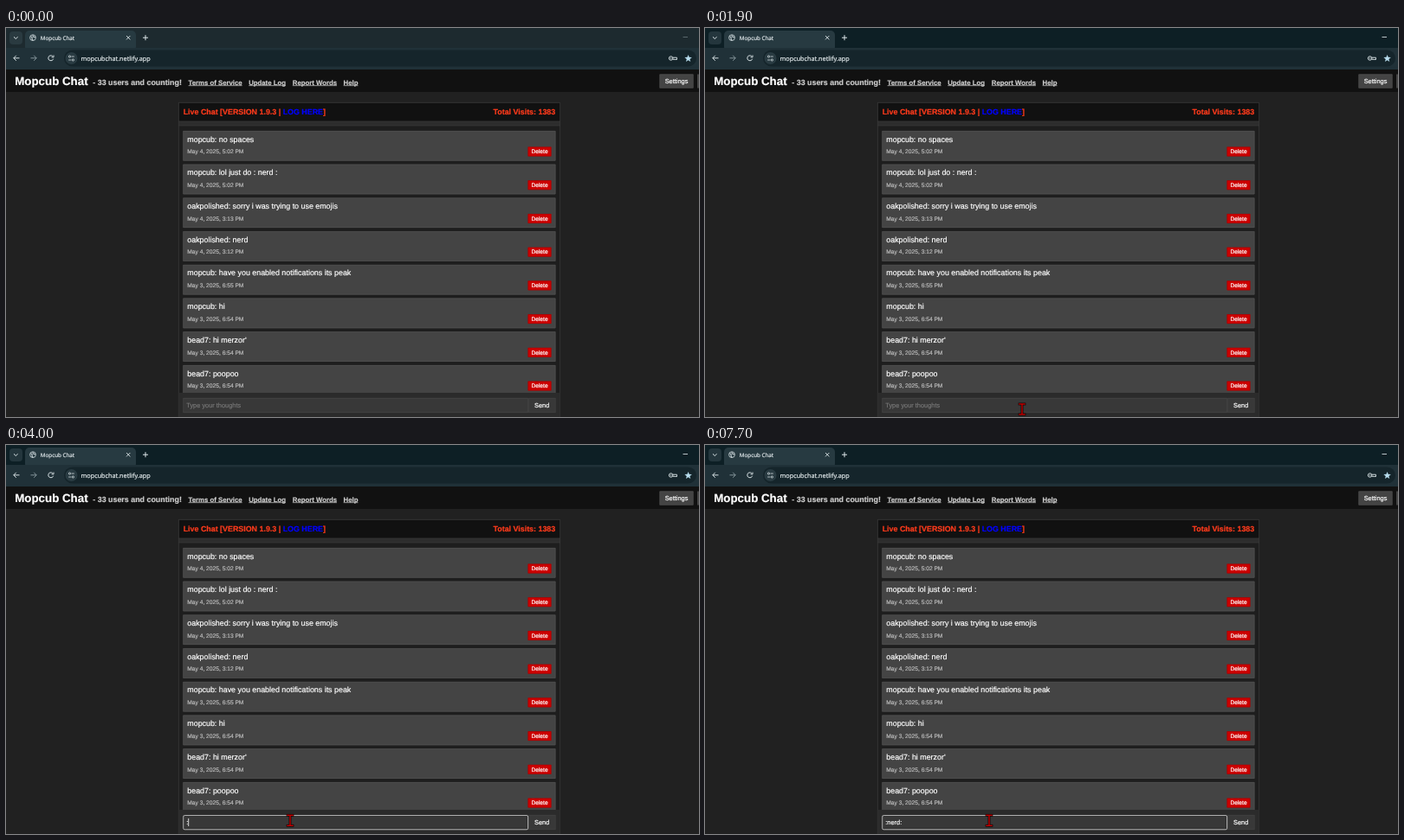
Write an HTML page with a canvas that moves like this. It is 800x450 px and loops after 8 s.

```html
<!DOCTYPE html>
<html lang="en">
<head>
<meta charset="utf-8">
<title>Mopcub Chat</title>
<style>
  html, body { margin: 0; width: 100%; height: 100%; overflow: hidden; background: #212121; }
  canvas { display: block; width: 800px; height: 450px; }
</style>
</head>
<body>
<canvas id="stage" width="800" height="450"></canvas>
<script>
const ctx = document.getElementById('stage').getContext('2d');
const LOOP = 8000, STEP = 100;
const PX = 5 / 9; // page pixels to stage pixels
const SANS = '"Liberation Sans", Arial, sans-serif';
const UI = '"Open Sans", "Noto Sans", sans-serif';

const MESSAGES = [
  ['mopcub: no spaces', 'May 4, 2025, 5:02 PM'],
  ['mopcub: lol just do : nerd :', 'May 4, 2025, 5:02 PM'],
  ['oakpolished: sorry i was trying to use emojis', 'May 4, 2025, 3:13 PM'],
  ['oakpolished: nerd', 'May 4, 2025, 3:12 PM'],
  ['mopcub: have you enabled notifications its peak', 'May 3, 2025, 6:55 PM'],
  ['mopcub: hi', 'May 3, 2025, 6:54 PM'],
  ["bead7: hi merzor'", 'May 3, 2025, 6:54 PM'],
  ['bead7: poopoo', 'May 3, 2025, 6:54 PM']
];

const ACTIVE_AT = 1200, FOCUS_AT = 2000;
const TYPING = [[3800, ':'], [5900, ':n'], [6000, ':ne'], [6500, ':ner'], [6700, ':nerd'], [7200, ':nerd:']];
const CARET_FLIPS = [2000, 2600, 3100, 3600, 3800, 4400, 4900, 5400, 5900, 7700];
const POINTER = [[1700, 374, 449], [1900, 366, 441], [2100, 361, 437.5], [2300, 361, 437.5], [2400, 360.5, 437],
  [2700, 343, 436], [3100, 328, 434.3]];

function rect(x, y, w, h, fill, radius = 0) {
  ctx.fillStyle = fill;
  ctx.beginPath();
  ctx.roundRect(x, y, w, h, radius);
  ctx.fill();
}

function frame(x, y, w, h, color, width = 0.6, radius = 0) {
  ctx.strokeStyle = color;
  ctx.lineWidth = width;
  ctx.beginPath();
  ctx.roundRect(x + width / 2, y + width / 2, w - width, h - width, radius);
  ctx.stroke();
}

function line(color, width, ...points) {
  ctx.strokeStyle = color;
  ctx.lineWidth = width;
  ctx.beginPath();
  points.forEach(([x, y], i) => i ? ctx.lineTo(x, y) : ctx.moveTo(x, y));
  ctx.stroke();
}

function circle(x, y, r, color, width, from = 0, to = Math.PI * 2) {
  ctx.strokeStyle = color;
  ctx.lineWidth = width;
  ctx.beginPath();
  ctx.arc(x, y, r, from, to);
  ctx.stroke();
}

// A hairline stroke gives the text the weight of screen-rendered type.
function text(str, x, y, size, color, { bold = false, family = SANS, align = 'left', underline = false } = {}) {
  ctx.font = `${bold ? 'bold ' : ''}${size}px ${family}`;
  ctx.textAlign = align;
  ctx.fillStyle = ctx.strokeStyle = color;
  ctx.lineWidth = 0.2;
  ctx.lineJoin = 'round';
  ctx.fillText(str, x, y);
  ctx.strokeText(str, x, y);
  const width = ctx.measureText(str).width;
  if (underline) ctx.fillRect(x, y + 0.8, width, 0.7);
  return width;
}

function drawTabs(active) {
  rect(0, 0, 800, 24, active ? '#0d1f25' : '#1d2a2f');
  rect(4, 4, 15, 15, active ? '#24363d' : '#2a3a40', 4);
  line('#dce5e8', 1, [9, 10.3], [11.3, 12.5], [13.6, 10.3]);

  rect(22, 3, 128, 24, '#273a41', 5);
  circle(31, 11.2, 3.4, '#c3ced2', 0.9);
  line('#c3ced2', 1.1, [28.4, 9.6], [30.2, 11], [30, 13], [31.3, 14.3]);
  line('#c3ced2', 1.1, [31, 8], [31.4, 10], [34, 11]);
  text('Mopcub Chat', 39.8, 13.7, 6.3, '#e4ebee', { family: UI });
  line('#dce5e8', 0.9, [139, 9], [143.4, 13.4]);
  line('#dce5e8', 0.9, [143.4, 9], [139, 13.4]);
  line('#dce5e8', 1, [158, 11.2], [164, 11.2]);
  line('#dce5e8', 1, [161, 8.2], [161, 14.2]);
  line(active ? '#e8eff1' : '#69777c', 0.8, [781.5, 10.5], [787, 10.5]);
}

function drawToolbar() {
  rect(0, 23, 800, 25, '#203138');
  rect(67, 25.5, 730, 19, '#15252b', 9.5);

  const light = '#d3dde0', dim = '#84949a';
  line(light, 1, [15.5, 34.8], [8.8, 34.8]);
  line(light, 1, [11.8, 31.8], [8.8, 34.8], [11.8, 37.8]);
  line(dim, 1, [28.5, 34.8], [35.2, 34.8]);
  line(dim, 1, [32.2, 31.8], [35.2, 34.8], [32.2, 37.8]);
  circle(51.8, 34.8, 3, light, 1, 0.3, 5.6);
  line(light, 1, [55, 31.5], [55, 33.8], [52.6, 33.8]);

  ctx.fillStyle = '#293b42';
  ctx.beginPath();
  ctx.arc(75.5, 35, 7, 0, Math.PI * 2);
  ctx.fill();
  circle(73.5, 33, 1.1, light, 0.8);
  line(light, 0.8, [75.5, 33], [78.8, 33]);
  circle(77.4, 37, 1.1, light, 0.8);
  line(light, 0.8, [72.2, 37], [75.4, 37]);
  text('mopcubchat.netlify.app', 86.5, 37.8, 7.3, '#e6edef', { family: UI });

  circle(767.6, 35, 2.2, light, 1);
  circle(767.6, 35, 0.5, light, 0.7);
  line(light, 1, [769.8, 34.2], [774.4, 34.2], [774.4, 36.5], [772.5, 36.5], [769.6, 36.2]);

  ctx.fillStyle = '#b7dced';
  ctx.beginPath();
  for (let i = 0; i < 10; i++) {
    const r = i % 2 ? 1.9 : 4.5, a = i * Math.PI / 5 - Math.PI / 2;
    ctx.lineTo(787.6 + r * Math.cos(a), 35.4 + r * Math.sin(a));
  }
  ctx.fill();
}

function drawHeader() {
  rect(0, 48, 800, 26, '#111111');
  text('Mopcub Chat', 10.2, 65.6, 24 * PX, '#ffffff', { bold: true });
  text('- 33 users and counting!', 100.3, 65.8, 16 * PX, '#cccccc', { bold: true });
  const links = [['Terms of Service', 210.6], ['Update Log', 280.2], ['Report Words', 330.8], ['Help', 389.6]];
  for (const [label, x] of links) {
    text(label, x, 65.6, 14 * PX, '#cccccc', { bold: true, underline: true });
  }
  rect(754.5, 53.5, 39, 16, '#444444');
  frame(754.5, 53.5, 39, 16, '#505050');
  text('Settings', 774, 64, 13.333 * PX, '#ffffff', { align: 'center' });
  rect(798, 53.5, 2, 16, '#444444');
}

function drawMessage([message, date], i) {
  const y = 119 + i * 38.72;
  rect(204.4, y, 430, 34.6, '#444444');
  frame(204.4, y, 430, 34.6, '#555555');
  text(message, 209.3, y + 12.6, 16 * PX, '#ffffff');
  text(date, 209.3, y + 26.2, 12 * PX, '#bbbbbb');
  rect(602.6, y + 18.6, 26.8, 10.8, '#cc0000');
  frame(602.6, y + 18.6, 26.8, 10.8, '#a00000', 0.55);
  text('Delete', 616, y + 26.2, 12 * PX, '#ffffff', { align: 'center' });
}

function drawChat() {
  rect(199, 86, 441, 364, '#2d2d2d');
  rect(199.6, 86.6, 440, 21.2, '#111111');
  rect(199.6, 113, 440, 309, '#1e1e1e');
  frame(199, 86, 441, 370, '#3a3a3a', 0.7);
  line('#3a3a3a', 0.6, [199, 108], [640, 108]);
  line('#3a3a3a', 0.6, [199, 113], [640, 113]);

  const size = 16 * PX, red = '#ff3b1c', bold = { bold: true };
  let x = 204.7;
  x += text('Live Chat [VERSION 1.9.3 | ', x, 99.5, size, red, bold);
  x += text('LOG HERE', x, 99.5, size, '#0000ff', bold);
  text(']', x, 99.5, size, red, bold);
  text('Total Visits: 1383', 634.2, 99.5, size, red, { bold: true, align: 'right' });

  ctx.save();
  ctx.beginPath();
  ctx.rect(199, 113, 441, 309);
  ctx.clip();
  MESSAGES.forEach(drawMessage);
  ctx.restore();
}

function drawInput(t) {
  const typed = TYPING.reduce((now, [at, str]) => t >= at ? str : now, '');
  const focused = t >= FOCUS_AT;
  const size = 13.333 * PX;

  rect(199.6, 422, 440, 28, '#2b2b2b');
  rect(204.4, 428, 398.6, 17, '#383838');
  frame(204.4, 428, 398.6, 17, '#484848');
  rect(603, 428, 31.5, 17, '#383838');
  frame(603, 428, 31.5, 17, '#444444');
  text('Send', 618.7, 438.8, size, '#ffffff', { align: 'center' });
  if (focused) {
    frame(205, 428.9, 397.4, 15.6, '#181818', 0.7, 1);
    frame(204.4, 428.2, 398.6, 17, '#dddddd', 0.8, 1.5);
  }

  const width = text(typed, 208.3, 438.7, size, '#ffffff');
  if (!typed) text('Type your thoughts', 208.3, 438.7, size, '#757575');
  const caretOn = CARET_FLIPS.filter(at => t >= at).length % 2 === 1;
  if (caretOn) rect(208.3 + width, 432, 0.8, 9, '#ffffff');
}

function drawPointer(t) {
  if (t < POINTER[0][0]) return;
  const next = POINTER.findIndex(([at]) => at > t);
  let [, x, y] = POINTER[POINTER.length - 1];
  if (next > 0) {
    const [t0, x0, y0] = POINTER[next - 1], [t1, x1, y1] = POINTER[next];
    const k = (t - t0) / (t1 - t0);
    x = x0 + (x1 - x0) * k;
    y = y0 + (y1 - y0) * k;
  }
  for (const [color, width, grow] of [['#100000', 2.8, 0.6], ['#c40000', 1.4, 0]]) {
    const w = 3.7 + grow, h = 6;
    line(color, width, [x - w, y - h], [x + w, y - h]);
    line(color, width, [x, y - h], [x, y + h]);
    line(color, width, [x - w, y + h], [x + w, y + h]);
  }
}

function draw(now) {
  const t = Math.floor(now % LOOP / STEP) * STEP;
  ctx.textRendering = 'geometricPrecision';
  rect(0, 0, 800, 450, '#212121');
  drawTabs(t >= ACTIVE_AT);
  drawToolbar();
  drawHeader();
  drawChat();
  drawInput(t);
  drawPointer(t);
}

let start;
function tick(now) {
  start ??= now;
  draw(now - start);
  requestAnimationFrame(tick);
}
requestAnimationFrame(tick);
</script>
</body>
</html>
```
